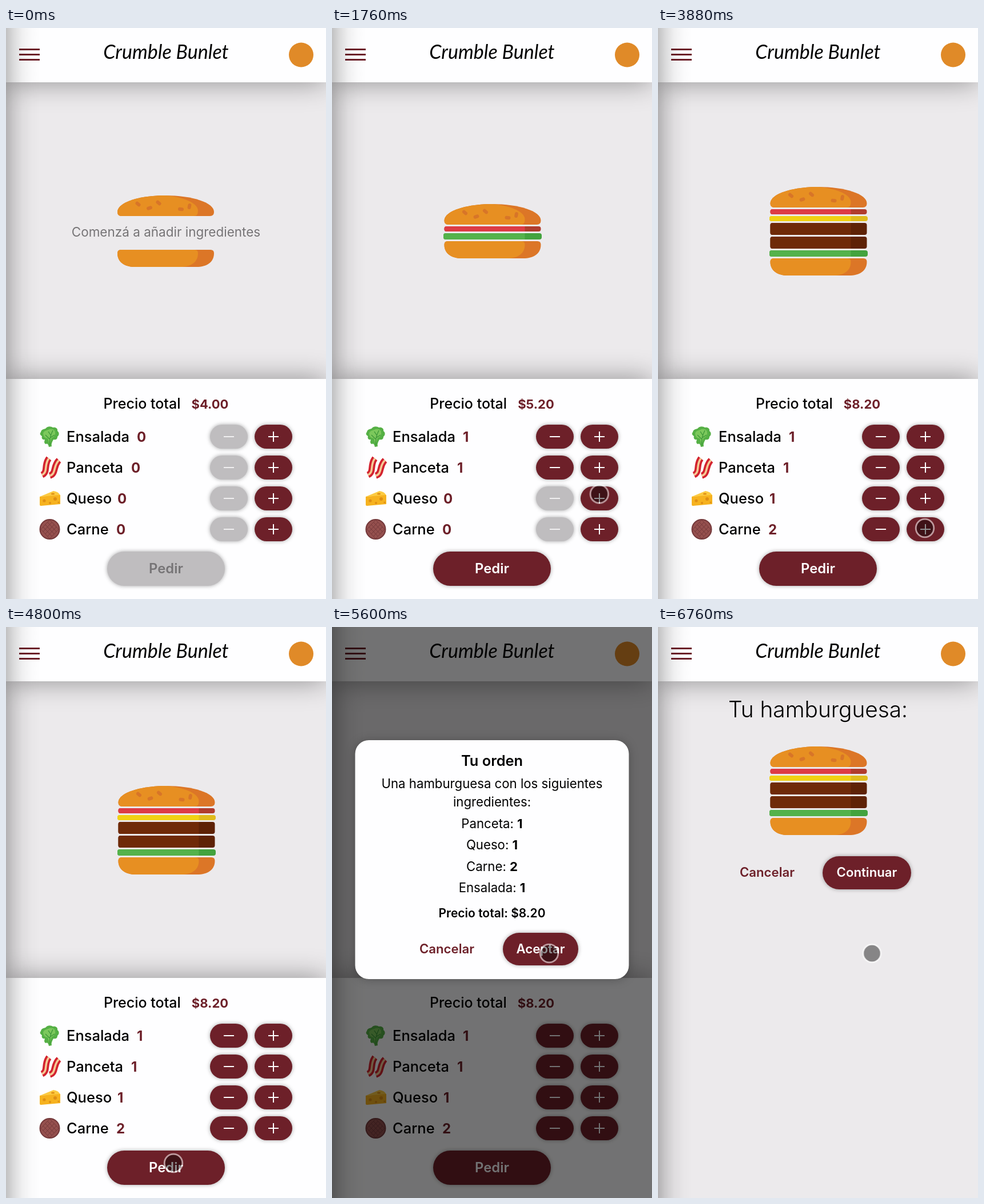
Recreate the animation shown at these times as an HTML page. Size 560 by 999 pixels, loop 6.8 s.

```html
<!DOCTYPE html>
<html lang="es">
<head>
<meta charset="utf-8">
<title>Crumble Bunlet</title>
<style>
  html, body { margin: 0; width: 100%; height: 100%; overflow: hidden; background: #eceaec; }
  svg { display: block; width: 560px; height: 999px; font: 500 22.2px Inter, "Open Sans", sans-serif; }
  .mid { text-anchor: middle; }
  .bold { font-weight: 600; }
  .heavy { font-weight: 700; }
  .plain { font-weight: 400; }
  .red { fill: #6d2029; }
  .white { fill: #fefeff; }
  .list { font-size: 25.5px; }
  .total { font-size: 25px; }
  .count { font-size: 24px; }
  .price { font-size: 22px; }
  .sheet { fill: #fefeff; filter: drop-shadow(0 0 24px rgba(0, 0, 0, .4)); }
  .btn { fill: #6d2029; filter: drop-shadow(0 0 3.5px rgba(0, 0, 0, .35)); }
  .btn.off { fill: #bfbdbf; }
  .sign { stroke: #fefeff; stroke-width: 2; }
  .off + .sign { stroke: #f0eff0; }
  .off + text { fill: #767476; }

  #pay { animation: show 6.8s infinite; }
  #shade { animation: shade 6.8s infinite; }
  #modal { animation: modal 6.8s linear infinite; }
  #cursor { animation: cursor 6.8s ease-in-out infinite; }

  @keyframes show {
    0%, 87.64% { opacity: 0; }
    87.65%, 100% { opacity: 1; }
  }
  @keyframes shade {
    0%, 72.35% { opacity: 0; }
    72.36%, 87.64% { opacity: 1; }
    87.65%, 100% { opacity: 0; }
  }
  @keyframes modal {
    0% { transform: translateY(-999px); opacity: 0; }
    72.35% { transform: translateY(-999px); opacity: 0; animation-timing-function: ease-out; }
    76.76%, 87.64% { transform: translateY(0); opacity: 1; }
    87.65%, 100% { transform: translateY(-999px); opacity: 0; }
  }
  @keyframes cursor {
    0%, .6% { transform: translate(580px, 56px); }
    8%, 11.5% { transform: translate(468px, 714px); }
    14.7% { transform: translate(465px, 758px); animation-timing-function: ease-out; }
    16.5%, 22.5% { transform: translate(466px, 768px); }
    27%, 35.3% { transform: translate(468px, 822px); animation-timing-function: ease-in; }
    37.65% { transform: translate(470px, 848px); animation-timing-function: ease-out; }
    40%, 44% { transform: translate(468px, 876px); }
    54%, 60% { transform: translate(467px, 875px); }
    69%, 74.5% { transform: translate(293px, 938px); }
    81%, 84% { transform: translate(380px, 571px); }
    89%, 100% { transform: translate(374.5px, 571px); }
  }
</style>
</head>
<body>
<svg viewBox="0 0 560 999">
  <defs>
    <linearGradient id="edge">
      <stop offset="0" stop-opacity=".24"/>
      <stop offset=".22" stop-opacity=".14"/>
      <stop offset=".48" stop-opacity=".055"/>
      <stop offset=".75" stop-opacity=".015"/>
      <stop offset="1" stop-opacity="0"/>
    </linearGradient>

    <g id="top">
      <path fill="#dc7627" d="M0 29C0 12 38 0 84 0S169 12 169 29Q169 36 162 36H7Q0 36 0 29Z"/>
      <path fill="#e78f22" d="M0 29C0 12 38 0 84 0C112 2 141 12 141 27Q141 36 134 36H7Q0 36 0 29Z"/>
      <g id="seeds" fill="#d87528"></g>
    </g>
    <g id="bottom">
      <path fill="#dc7627" d="M6 0H163Q169 0 169 6C169 22 156 30 138 30H31C13 30 0 22 0 6Q0 0 6 0Z"/>
      <path fill="#e78f22" d="M6 0H135Q141 0 141 6C141 22 128 30 110 30H31C13 30 0 22 0 6Q0 0 6 0Z"/>
    </g>

    <g id="icon-salad">
      <path fill="#55b045" d="M2 10C3 5 7 5 10 4C14-1 20 0 23 2C28 1 32 4 31 8C35 11 34 16 31 18C31 23 27 24 24 23C22 27 20 30 21 35L16 36C15 31 13 29 11 31C7 30 8 26 9 23C4 24 3 20 4 17C0 15 0 12 2 10Z"/>
      <path fill="#7cc85c" d="M6 12C8 7 13 7 17 5C22 4 27 6 27 10C28 15 25 19 21 20L17 31L14 21C9 21 6 17 6 12Z"/>
      <path fill="none" stroke="#3b9638" stroke-width="1.3" d="M18 33C16 24 19 15 23 7M17 22L10 15M19 15L15 9M18 20L26 15"/>
    </g>
    <g id="icon-bacon" fill="none">
      <g id="strip">
        <path stroke="#d3232f" stroke-width="11" d="M4 31C15 26 7 13 16 2"/>
        <path stroke="#f5cb95" stroke-width="3.5" d="M4 31C15 26 7 13 16 2"/>
      </g>
      <use href="#strip" transform="translate(18 1) rotate(8)"/>
    </g>
    <g id="icon-cheese">
      <path fill="#fccb42" d="M0 15L24 5Q33 6 36 13Z"/>
      <path fill="#f6b21f" d="M0 15L36 12V28L2 31Q0 31 0 29Z"/>
      <g fill="#df8f14">
        <circle cx="8" cy="22" r="2.6"/><circle cx="18" cy="26" r="2"/>
        <circle cx="27" cy="19" r="3"/><ellipse cx="23" cy="10" rx="3" ry="1.6"/>
        <circle cx="33" cy="25" r="1.6"/>
      </g>
    </g>
    <g id="icon-meat">
      <circle cx="17.5" cy="18" r="17" fill="#95504e" stroke="#74393b" stroke-width="2"/>
      <path id="grill" stroke="#74393b" stroke-width="1"/>
    </g>
  </defs>

  <rect width="560" height="999" fill="#eceaec"/>
  <g id="burger"></g>
  <text id="hint" class="mid plain" x="280" y="365" font-size="22.5" fill="#767476">Comenzá a añadir ingredientes</text>

  <rect class="sheet" y="614" width="560" height="385"/>
  <text class="mid total" x="280" y="666">Precio total<tspan id="price" class="price heavy red" dx="19"></tspan></text>
  <g id="rows"></g>
  <rect id="order" class="btn" x="177" y="916" width="206" height="60" rx="30"/>
  <text class="mid bold white" x="280" y="954" font-size="23.8">Pedir</text>

  <g id="pay">
    <rect width="560" height="999" fill="#eceaec"/>
    <text class="mid" x="280" y="158" font-size="38.8" font-weight="300">Tu hamburguesa:</text>
    <g id="served"></g>
    <text class="mid bold red" x="191" y="437">Cancelar</text>
    <rect class="btn" x="288" y="401" width="155" height="58" rx="29"/>
    <text class="mid bold white" x="365.5" y="437">Continuar</text>
  </g>

  <rect class="sheet" width="560" height="95"/>
  <path d="M23 37.5H59M23 46.5H59M23 55.5H59" stroke="#6d2029" stroke-width="3"/>
  <text class="mid" x="280" y="54" style="font: italic 400 34px Lato, sans-serif">Crumble Bunlet</text>
  <circle cx="516.5" cy="47" r="21.5" fill="#e08a28"/>
  <rect width="60" height="999" fill="url(#edge)"/>

  <rect id="shade" width="560" height="999" fill-opacity=".55"/>
  <g id="modal">
    <rect x="40.5" y="198" width="479" height="418" rx="24" fill="#fefeff" style="filter: drop-shadow(0 1px 8px rgba(0, 0, 0, .26))"/>
    <g class="mid plain">
      <text class="bold" x="280" y="243" font-size="25.4">Tu orden</text>
      <text x="280" y="282">Una hamburguesa con los siguientes</text>
      <text x="280" y="314">ingredientes:</text>
      <text x="280" y="352">Panceta: <tspan class="heavy">1</tspan></text>
      <text x="280" y="389">Queso: <tspan class="heavy">1</tspan></text>
      <text x="280" y="427">Carne: <tspan class="heavy">2</tspan></text>
      <text x="280" y="464">Ensalada: <tspan class="heavy">1</tspan></text>
      <text class="bold" x="280" y="508" font-size="21">Precio total: $8.20</text>
    </g>
    <text class="mid bold red" x="201" y="571">Cancelar</text>
    <rect class="btn" x="299" y="535" width="132" height="57" rx="28.5"/>
    <text class="mid bold white" x="365" y="571">Aceptar</text>
  </g>

  <g id="cursor">
    <circle r="14.5" fill-opacity=".43"/>
    <circle r="15.8" fill="none" stroke="#fff" stroke-opacity=".55" stroke-width="2.8"/>
  </g>
</svg>

<script>
  const LOOP = 6800;
  const $ = id => document.getElementById(id);

  const foods = {
    salad: { label: 'Ensalada', cost: 0.5, countX: 229, h: 11, out: 1.5, light: '#54b24b', dark: '#43a33e' },
    bacon: { label: 'Panceta', cost: 0.7, countX: 219, h: 9, out: 0, light: '#dd3c45', dark: '#b03c2e' },
    cheese: { label: 'Queso', cost: 0.4, countX: 195, h: 9, out: 1.5, light: '#f1d213', dark: '#e0bc1c' },
    meat: { label: 'Carne', cost: 1.3, countX: 193, h: 21, out: 0, light: '#6f2a08', dark: '#5e2206' }
  };
  const keys = Object.keys(foods);
  const stackOrder = ['bacon', 'cheese', 'meat', 'salad'];
  const clicks = [[700, 'salad'], [1320, 'bacon'], [2240, 'cheese'], [3000, 'meat'], [3700, 'meat']];

  function countsAfter(n) {
    const counts = { salad: 0, bacon: 0, cheese: 0, meat: 0 };
    clicks.slice(0, n).forEach(([, key]) => counts[key]++);
    return counts;
  }

  // One filling: light bar with a shaded right end.
  function layer({ h, out, light, dark }, y) {
    const r = 4, left = -out;
    return `<g transform="translate(0 ${y})">
      <rect x="${left}" width="${169 + 2 * out}" height="${h}" rx="${r}" fill="${dark}"/>
      <path fill="${light}" d="M141 0H${left + r}a${r} ${r} 0 0 0 ${-r} ${r}v${h - 2 * r}a${r} ${r} 0 0 0 ${r} ${r}H141Z"/>
    </g>`;
  }

  function burger(counts, centre) {
    const fill = stackOrder.flatMap(key => Array(counts[key]).fill(foods[key]));
    const gap = 3;
    const inner = fill.length ? fill.reduce((sum, f) => sum + f.h + gap, gap) : 59;
    const x = fill.length ? 196.5 : 195;
    let y = centre - (66 + inner) / 2;
    let out = `<use href="#top" y="${y}"/><use href="#bottom" y="${y + 36 + inner}"/>`;
    y += 36 + gap;
    for (const f of fill) {
      out += layer(f, y);
      y += f.h + gap;
    }
    return `<g transform="translate(${x} 0)">${out}</g>`;
  }

  function row(key, i) {
    const y = 715 + 54 * i, { label, countX } = foods[key];
    return `<use href="#icon-${key}" x="59" y="${y - 18}"/>
      <text class="list" x="106" y="${y + 9}">${label}</text>
      <text id="${key}-count" class="count heavy red" x="${countX}" y="${y + 9}"></text>
      <rect id="${key}-less" class="btn" x="357" y="${y - 21}" width="66" height="42" rx="21"/>
      <path class="sign" d="M381 ${y}h18"/>
      <rect class="btn" x="435" y="${y - 21}" width="66" height="42" rx="21"/>
      <path class="sign" d="M459 ${y}h18m-9-9v18"/>`;
  }

  function draw(n) {
    const counts = countsAfter(n);
    const total = keys.reduce((sum, key) => sum + counts[key] * foods[key].cost, 4);
    for (const key of keys) {
      $(key + '-count').textContent = counts[key];
      $(key + '-less').classList.toggle('off', !counts[key]);
    }
    $('price').textContent = '$' + total.toFixed(2);
    $('order').classList.toggle('off', !n);
    $('hint').style.display = n ? 'none' : '';
    $('burger').innerHTML = burger(counts, 355.5);
  }

  $('seeds').innerHTML = [[36, 15, 40], [56, 22, -20], [72, 13, 40], [111, 24, 6], [126, 19, -80]]
    .map(([x, y, a]) => `<rect x="-5" y="-3" width="10" height="6" rx="3" transform="translate(${x} ${y}) rotate(${a})"/>`)
    .join('');
  $('grill').setAttribute('d', [-8, -4, 0, 4, 8]
    .map(o => `M${10 + o} ${10 - o}l15 16M${25 + o} ${10 + o}l-15 16`).join(''));
  $('rows').innerHTML = keys.map(row).join('');
  $('served').innerHTML = burger(countsAfter(clicks.length), 286.5);

  let start, shown = 0;
  draw(0);

  function tick(now) {
    start ??= now;
    const t = (now - start) % LOOP;
    const n = clicks.filter(([at]) => at <= t).length;
    if (n !== shown) draw(shown = n);
    requestAnimationFrame(tick);
  }
  requestAnimationFrame(tick);
</script>
</body>
</html>
```
